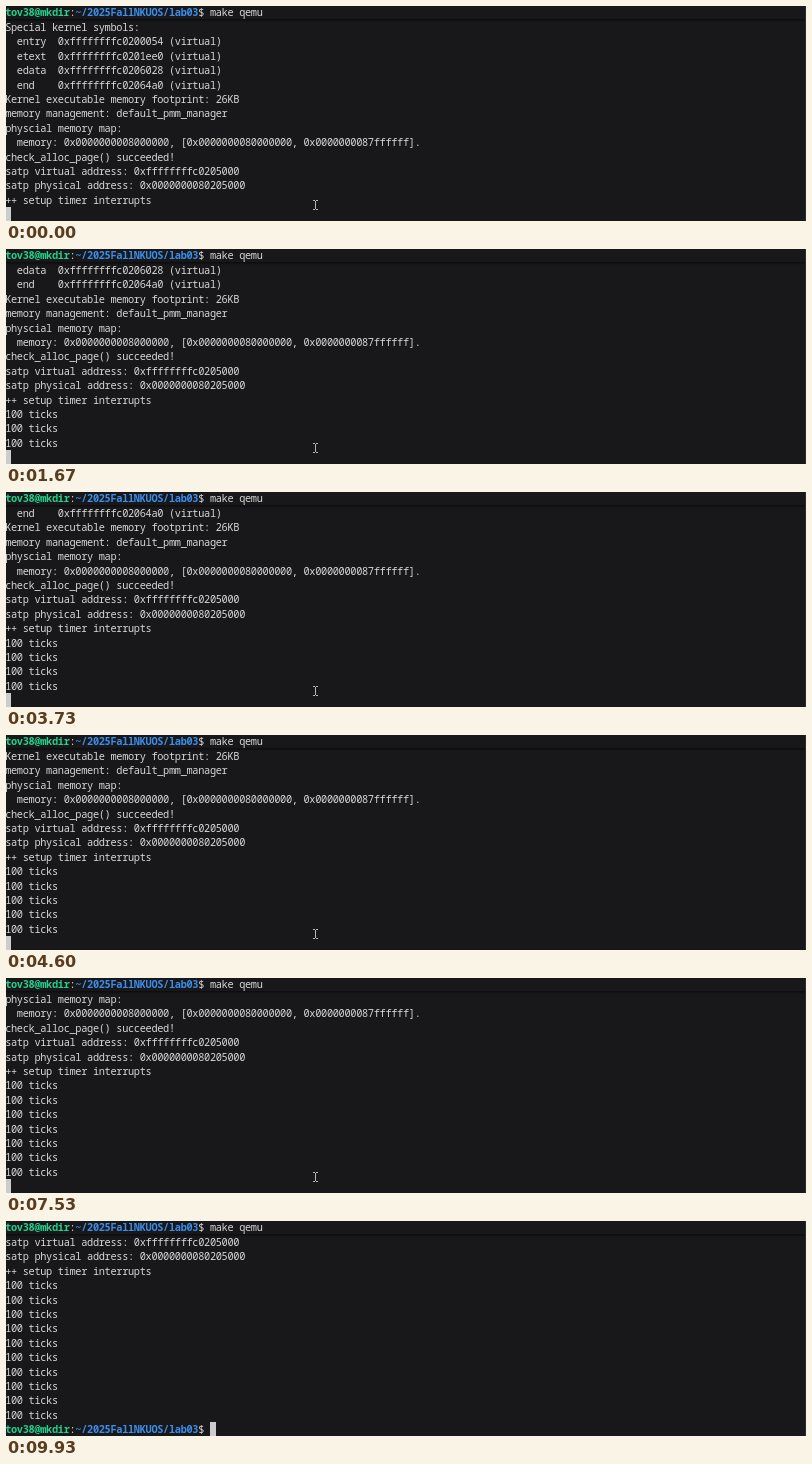
Write an HTML page with a canvas that moves like this. It is 800x215 px and loops after 10000 ms.

```html
<!DOCTYPE html>
<html lang="en">
<head>
<meta charset="utf-8">
<title>Terminal</title>
<style>
  html, body { margin: 0; width: 100%; height: 100%; overflow: hidden; background: #181719; }
  canvas { display: block; width: 800px; height: 215px; }
</style>
</head>
<body>
<canvas id="screen" width="800" height="215"></canvas>
<script>
const ctx = document.getElementById("screen").getContext("2d");

const LOOP = 10000;
const CELL = 5.85, LEFT = -0.7, PITCH = 14.4;
const ROWS = 14, FIRST_BASELINE = 25, HEADER_BASELINE = 10;
const FONT = '10.3px "Noto Sans Mono", "DejaVu Sans Mono", monospace';
const BACK = "#181719", TEXT = "#d8d8d8", GREEN = "#23d18b", BLUE = "#3b8eea";

const PROMPT = [
  ["tov38@mkdir", GREEN, "bold"],
  [":", TEXT],
  ["~/2025FallNKUOS/lab03", BLUE, "bold"],
  ["$ ", TEXT]
];

const BOOT = `Special kernel symbols:
  entry  0xffffffffc0200054 (virtual)
  etext  0xffffffffc0201ee0 (virtual)
  edata  0xffffffffc0206028 (virtual)
  end    0xffffffffc02064a0 (virtual)
Kernel executable memory footprint: 26KB
memory management: default_pmm_manager
physcial memory map:
  memory: 0x0000000008000000, [0x0000000080000000, 0x0000000087ffffff].
check_alloc_page() succeeded!
satp virtual address: 0xffffffffc0205000
satp physical address: 0x0000000080205000
++ setup timer interrupts`.split("\n");

const TICKS = [300, 950, 1600, 2850, 4150, 5300, 6450, 7600, 8650, 9740];
const SHUTDOWN = TICKS[TICKS.length - 1];

// Pointer path: time, x, y
const POINTER = [
  [0, 309, 199], [8150, 309, 199], [8600, 364, 21], [8900, 364, 21], [9100, 390, -12]
];

// Draws on the terminal grid and returns the next free column.
function drawText(text, column, baseline, color = TEXT, weight = 500) {
  ctx.font = `${weight} ${FONT}`;
  ctx.textAlign = "center";
  ctx.fillStyle = color;
  for (const char of text) {
    if (char !== " ") ctx.fillText(char, LEFT + (column + 0.5) * CELL, baseline);
    column++;
  }
  return column;
}

function drawPrompt(baseline) {
  return PROMPT.reduce(
    (column, [text, color, weight]) => drawText(text, column, baseline, color, weight), 0);
}

function drawHeader() {
  ctx.fillStyle = BACK;
  ctx.fillRect(0, 0, 800, 13);
  const shadow = ctx.createLinearGradient(0, 13, 0, 16);
  shadow.addColorStop(0, "rgba(0,0,0,.5)");
  shadow.addColorStop(1, "rgba(0,0,0,0)");
  ctx.fillStyle = shadow;
  ctx.fillRect(0, 13, 800, 3);
  drawText("make qemu", drawPrompt(HEADER_BASELINE), HEADER_BASELINE);
}

function pointerAt(time) {
  const next = POINTER.findIndex(point => point[0] > time);
  if (next < 0) return null;
  const [t0, x0, y0] = POINTER[next - 1];
  const [t1, x1, y1] = POINTER[next];
  const p = (time - t0) / (t1 - t0);
  const eased = p * p * (3 - 2 * p);
  return [x0 + (x1 - x0) * eased, y0 + (y1 - y0) * eased];
}

function drawPointer([px, py]) {
  const x = Math.round(px), y = Math.round(py);
  ctx.fillStyle = "#b8b8b8";
  ctx.fillRect(x, y - 4, 1, 8);
  for (const edge of [y - 5, y + 4]) {
    ctx.fillRect(x - 2, edge, 2, 1);
    ctx.fillRect(x + 1, edge, 2, 1);
  }
}

function draw(time) {
  ctx.fillStyle = BACK;
  ctx.fillRect(0, 0, 800, 215);

  const ticks = TICKS.filter(at => at <= time).length;
  const lines = [...BOOT, ...Array(ticks).fill("100 ticks")];
  lines.slice(1 - ROWS).forEach((line, row) =>
    drawText(line, 0, FIRST_BASELINE + row * PITCH));

  const lastBaseline = FIRST_BASELINE + (ROWS - 1) * PITCH;
  const column = time >= SHUTDOWN ? drawPrompt(lastBaseline) : 0;
  ctx.fillStyle = "#cccccc";
  ctx.fillRect(Math.round(LEFT + column * CELL), 201, 6, 14);

  drawHeader();
  ctx.fillStyle = "#2b2b2b";
  ctx.fillRect(799, 0, 1, 215);

  const pointer = pointerAt(time);
  if (pointer) drawPointer(pointer);
}

const start = performance.now();
function frame() {
  draw((performance.now() - start) % LOOP);
  requestAnimationFrame(frame);
}
frame();
</script>
</body>
</html>
```
